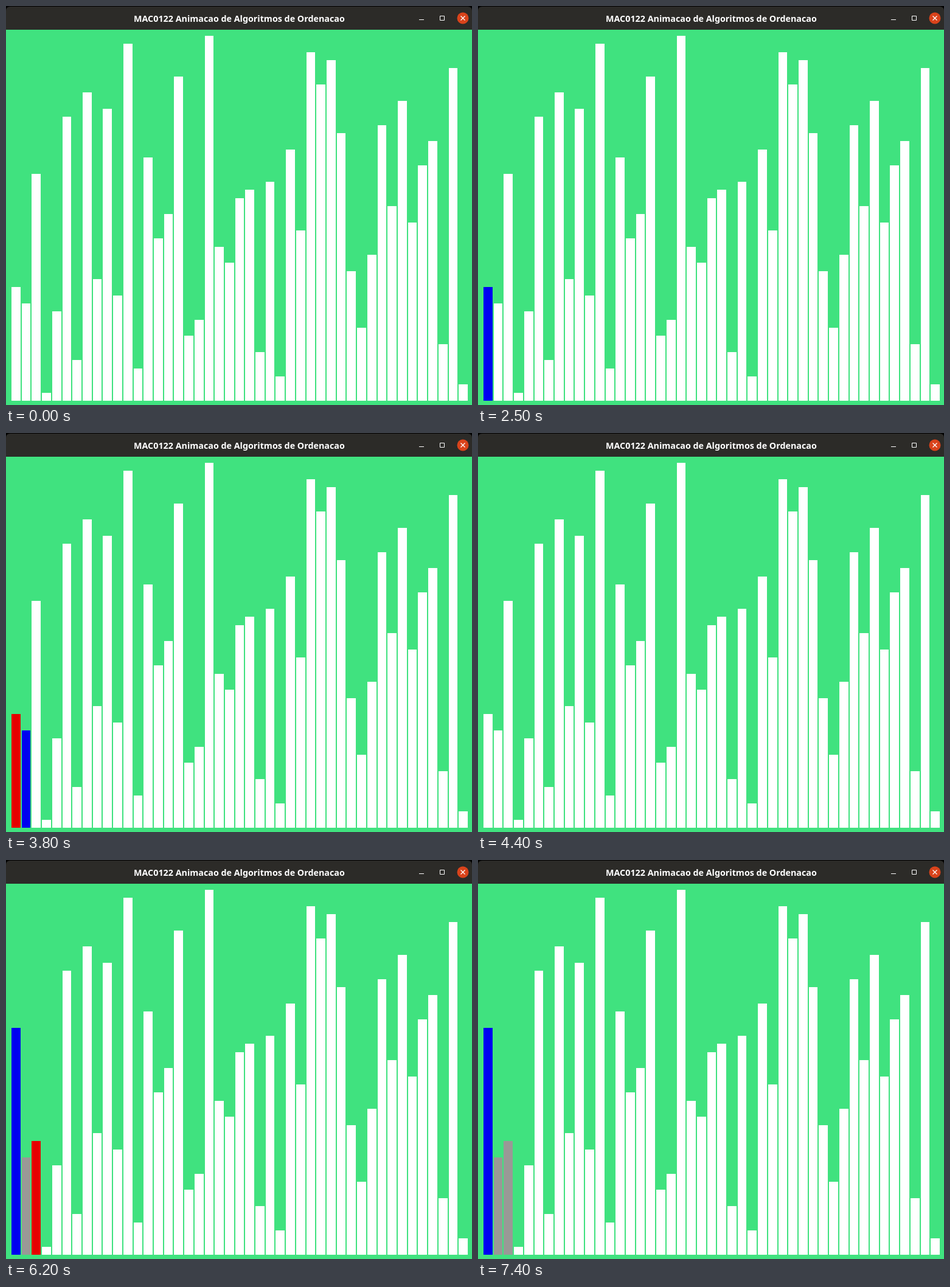
Recreate the animation shown at these times as an HTML page. Size 766 by 656 pixels, loop 8000 ms.

```html
<!DOCTYPE html>
<html lang="pt">
<head>
<meta charset="utf-8">
<title>Animacao de Algoritmos de Ordenacao</title>
<style>
  html, body { margin: 0; width: 100%; height: 100%; overflow: hidden; background: #000; }
  svg { display: block; width: 766px; height: 656px; }
  text { font: 700 14.3px "Noto Sans", "Open Sans", sans-serif; fill: #fff; text-anchor: middle; }
</style>
</head>
<body>
<svg viewBox="0 0 766 656">
  <path d="M0 39V8Q0 1 7 1H759Q766 1 766 8V39Z" fill="#2c2b28"/>
  <text x="383.4" y="26">MAC0122 Animacao de Algoritmos de Ordenacao</text>
  <g fill="none" stroke="#fff">
    <path d="M679 22.5h8M713.5 16.5h7v7h-7z"/>
    <circle cx="751" cy="20" r="9.5" fill="#d9431b" stroke="none"/>
    <path d="M747.5 16.5l7 7m0-7l-7 7" stroke-width="1.3"/>
  </g>
  <rect y="39" width="766" height="617" fill="#40e27f"/>
  <g id="bars" shape-rendering="crispEdges"></g>
</svg>
<script>
const LOOP = 8000, BASE = 649, LEFT = 9, PITCH = 752 / 45, UNIT = 600 / 45;
const COLORS = { w: '#fff', g: '#999996', r: '#e60000', b: '#0000f0' };
const values = [
  14, 12, 28, 1, 11, 35, 5, 38, 15, 36, 13, 44, 4, 30, 20, 23, 40, 8, 10, 45, 19, 17, 25,
  26, 6, 27, 3, 31, 21, 43, 39, 42, 33, 16, 9, 18, 34, 24, 37, 22, 29, 32, 7, 41, 2
];

// Heap insertions: start time, colours of the first three bars, root swapped with third
const steps = [
  [0, 'www'],
  [1400, 'gww'],
  [2500, 'bww'],
  [2600, 'www'],
  [3200, 'ggw'],
  [3800, 'rbw'],
  [4400, 'www'],
  [5500, 'ggg'],
  [5600, 'rgb'],
  [6200, 'bgr', true],
  [6800, 'ggg', true],
  [7400, 'bgg', true]
];

const group = document.getElementById('bars');
const setHeight = (bar, value) => {
  const top = Math.round(BASE - value * UNIT);
  bar.setAttribute('y', top);
  bar.setAttribute('height', BASE - top);
};

const bars = values.map((value, i) => {
  const bar = document.createElementNS('http://www.w3.org/2000/svg', 'rect');
  const x = Math.round(LEFT + i * PITCH);
  bar.setAttribute('x', x);
  bar.setAttribute('width', Math.round(LEFT + (i + 1) * PITCH - 2) - x);
  bar.setAttribute('fill', COLORS.w);
  setHeight(bar, value);
  return group.appendChild(bar);
});

let shown;
function draw(now) {
  const t = now % LOOP;
  const step = steps.findLast(s => s[0] <= t) || steps[0];
  if (step !== shown) {
    shown = step;
    const [, colors, swapped] = step;
    for (let i = 0; i < 3; i++) {
      bars[i].setAttribute('fill', COLORS[colors[i]]);
      setHeight(bars[i], values[swapped ? 2 - i : i]);
    }
  }
}

const start = performance.now();
function tick() {
  draw(performance.now() - start);
  requestAnimationFrame(tick);
}
tick();
</script>
</body>
</html>
```
